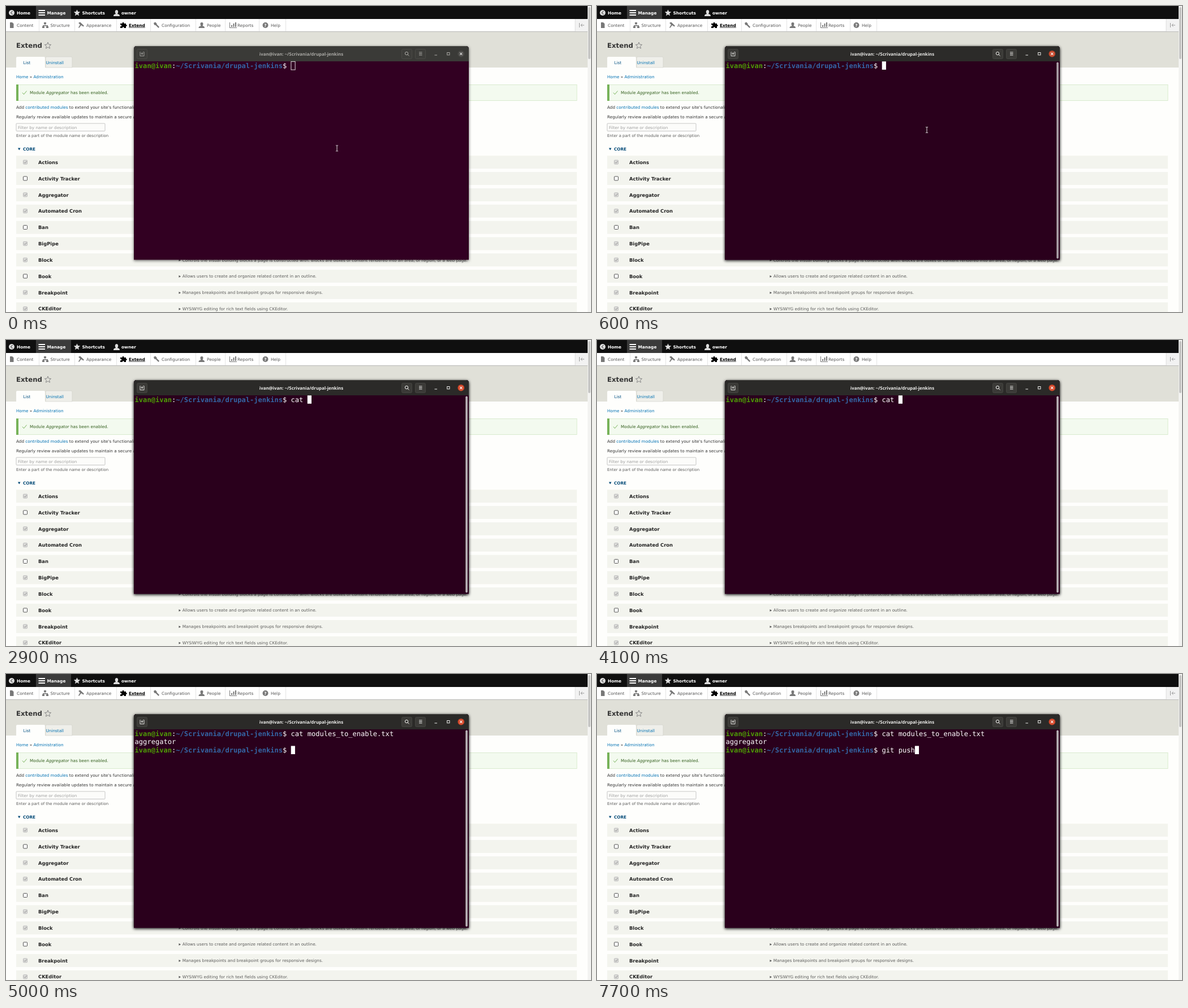
Animation of 1034 by 542 pixels, one loop 8000 ms. Source, as an HTML page:

```html
<!DOCTYPE html>
<html lang="en">
<head>
<meta charset="utf-8">
<title>Terminal over module list</title>
<style>
html, body { margin: 0; width: 100%; height: 100%; overflow: hidden; background: #fefefc; }
svg { display: block; width: 100vw; height: 100vh; }
text { font: 7.25px "DejaVu Sans", sans-serif; fill: #333; white-space: pre; text-rendering: geometricPrecision; }
.bar text { font-size: 7.4px; fill: #565656; }
.bar .top { font-weight: bold; fill: #fff; }
.bar .here { font-weight: bold; fill: #000; text-decoration: underline; }
.link { fill: #0071b3; }
.name { font-size: 8.37px; font-weight: bold; fill: #222; }
.desc { fill: #5c5c5b; }
.title { font: bold 7.85px "Noto Sans", sans-serif; text-anchor: middle; }
#term text { font: 12.07px "DejaVu Sans Mono", monospace; fill: #fff; }
#term .user { font-weight: bold; fill: #4e9a06; }
#term .path { font-weight: bold; fill: #3465a4; }
.line { fill: none; stroke-width: 1; }
</style>
</head>
<body>
<svg viewBox="0 0 1034 542">
  <defs>
    <filter id="shade" x="-5%" y="-5%" width="110%" height="110%">
      <feDropShadow dx="0" dy="1.5" stdDeviation="2.6" flood-opacity=".6"/>
    </filter>
  </defs>
  <rect width="1034" height="542" fill="#fefefc"/>
  <rect y="45" width="1028" height="64" fill="#e0e0d8"/>

  <g class="bar">
    <rect width="1028" height="23" fill="#0f0f0f"/>
    <rect x="53" width="62" height="23" fill="#3b3b3b"/>
    <rect y="23" width="1028" height="22" fill="#fff"/>
    <path d="M0 45.3H1028" stroke="#aaa" stroke-width=".8"/>
    <rect x="1006" y="23" width="22" height="22" fill="#f2f2f2"/>
    <path d="M1006 23V45" stroke="#ddd"/>
    <path class="line" d="M1013.5 30V38M1022 34H1016M1018.5 31.5L1016 34L1018.5 36.5" stroke="#999"/>
    <g id="tabs"></g>
    <circle cx="10" cy="12" r="5" fill="#ddd"/>
    <path class="line" d="M11.5 9L8.5 12L11.5 15" stroke="#111" stroke-width="1.5"/>
    <path d="M57.5 8H69M57.5 12H69M57.5 16H69" stroke="#fff" stroke-width="2"/>
    <g id="star" fill="#ddd"></g>
    <path d="M190 18C190 15 192 14.5 194 14C192 11 192.500 7 195.500 7S199 11 197 14C199 14.500 201 15 201 18Z" fill="#ddd"/>
    <g fill="#787878">
      <path d="M7 29H11L13.500 31.500V39H7Z"/>
      <path d="M67 29H71V32H69.500V34H74V36H75V39H71V36H72.500V35.500H66.500V36H68V39H64V36H65V34H68.500V32H67Z"/>
      <path d="M128 30L131 28.500L138 35L136.500 36.500L133 34L129 39L128 38L131 33Z"/>
      <path d="M261 30L264 28.500L266.500 31V32.500L271 37L269.500 39L264.500 34L262 33.500Z"/>
      <path d="M340.500 39C340.500 36 342.500 36 344.500 35.300C343 32 343 29 346 29S349 32 347.500 35.300C349.500 36 351 36 351 39Z"/>
      <path d="M395 29H396V38H408V39H395ZM398 34H400V37H398ZM401.500 31H403.500V37H401.500ZM405 29H407V37H405Z"/>
      <circle cx="458.500" cy="34" r="5"/>
    </g>
    <text x="458.500" y="36.600" text-anchor="middle" style="fill:#fff;font-weight:bold">?</text>
    <path d="M202 31H206C204.500 28 209.500 28 208 31H212V33.500C214.500 32 214.500 37 212 35.500V39H208.500C209.500 36.500 205 36.500 206 39H202V36C205 37 205 32 202 33.500Z"/>
  </g>

  <text x="18" y="74.200" style="font-size:11.75px;font-weight:bold">Extend</text>
  <g id="fave" class="line" stroke="#888"></g>
  <path d="M18 109V92Q18 90 20 90H67Q69 90 69 92V109Z" fill="#fefefc"/>
  <path d="M70 109V92Q70 90 72 90H115Q117 90 117 92V109Z" fill="#efefea" stroke="#cfcfc6" stroke-width=".6"/>
  <text x="30.500" y="102.700" style="fill:#004f80">List</text>
  <text class="link" x="70.500" y="102.700">Uninstall</text>
  <text x="18" y="127.500"><tspan class="link">Home</tspan> » <tspan class="link">Administration</tspan></text>

  <rect x="18.500" y="139.500" width="990.500" height="28" fill="#f3faef" stroke="#d3e8c5" stroke-width=".8"/>
  <rect x="18" y="139" width="4" height="29" fill="#77b259"/>
  <path class="line" d="M29 153.500L31.500 156.500L36.500 150.500" stroke="#77b259" stroke-width="2"/>
  <text x="42" y="156.200" style="fill:#325e1c">Module <tspan font-style="italic">Aggregator</tspan> has been enabled.</text>

  <text x="18" y="181.700">Add <tspan class="link">contributed modules</tspan> to extend your site's functionality.</text>
  <text x="18" y="198.700">Regularly review available updates to maintain a secure and current site.</text>
  <rect x="18" y="208" width="157" height="13.500" rx="1" fill="#fcfcfa" stroke="#b8b8b8" stroke-width=".8"/>
  <text x="21" y="217.500" style="fill:#a0a0a0">Filter by name or description</text>
  <text x="18" y="231.500" style="font-size:6.9px;fill:#595959">Enter a part of the module name or description</text>
  <path d="M21 251.500H25.500L23.250 255.500Z" fill="#004875"/>
  <text x="30" y="255.700" style="font-weight:bold;fill:#004875">CORE</text>
  <g id="rows"></g>

  <rect x="1028" width="6" height="542" fill="#f3f3f1"/>
  <rect x="1029" y="2" width="4" height="92" rx="2" fill="#c6c6c4"/>

  <g id="windows"></g>
  <g id="term">
    <g id="lines"></g>
    <rect id="caret" width="7.200" height="14.600"/>
    <path id="mouse" class="line" d="M-2 -5H-.7L0 -4.500L.7 -5H2M0 -4.500V4.500M-2 5H-.7L0 4.500L.7 5H2" stroke="#ddd" stroke-width="1.200"/>
  </g>
</svg>
<script>
const get = id => document.getElementById(id);
const text = (x, y, s, cls = '') => `<text x="${x}" y="${y}" class="${cls}">${s}</text>`;

function star(cx, cy, r) {
  const points = Array.from({ length: 10 }, (_, i) => {
    const a = (i / 5 - .5) * Math.PI, d = i % 2 ? r * .45 : r;
    return (cx + d * Math.cos(a)).toFixed(2) + ',' + (cy + d * Math.sin(a)).toFixed(2);
  });
  return `<polygon points="${points.join(' ')}"/>`;
}
get('star').innerHTML = star(125.5, 12.3, 6);
get('fave').innerHTML = star(74, 70.3, 6);

const topTabs = [[19, 'Home'], [72.5, 'Manage'], [134.5, 'Shortcuts'], [204, 'owner']];
const subTabs = [[19, 'Content', 58], [78.5, 'Structure', 121], [142, 'Appearance', 195], [217, 'Extend', 255],
  [275, 'Configuration', 335], [355, 'People', 387], [409, 'Reports', 447], [468, 'Help', 494]];
get('tabs').innerHTML = topTabs.map(([x, s]) => text(x, 14.8, s, 'top')).join('') +
  subTabs.map(([x, s, end]) => text(x, 36.7, s, s === 'Extend' ? 'here' : '') +
    `<path d="M${end + .5} 23V45" stroke="#ddd" stroke-width=".8"/>`).join('');

const modules = [['Actions', 1], ['Activity Tracker', 0], ['Aggregator', 1], ['Automated Cron', 1], ['Ban', 0], ['BigPipe', 1],
  ['Block', 1, 'Controls the visual building blocks a page is constructed with. Blocks are boxes of content rendered into an area, or region, of a web page.'],
  ['Book', 0, 'Allows users to create and organize related content in an outline.'],
  ['Breakpoint', 1, 'Manages breakpoints and breakpoint groups for responsive designs.'],
  ['CKEditor', 1, 'WYSIWYG editing for rich text fields using CKEditor.']];
get('rows').innerHTML = modules.map(([name, on, desc], i) => {
  const y = 276.7 + i * 28.85;
  const box = on ? 'fill="#dcdcda" stroke="#bbb"' : 'fill="#fff" stroke="#555"';
  return `<rect x="18" y="${y - 11.5}" width="991" height="23" fill="#f3f4ee"/>
    <rect x="30.5" y="${y - 3.6}" width="7" height="7" rx="1" ${box}/>` +
    (on ? `<path class="line" d="M32 ${y}l1.500 1.700l3 -3.500" stroke="#8b8b8b"/>` : '') +
    text(57, y + 3.1, name, 'name') +
    (desc ? `<path d="M305.500 ${y - 1.6}v4l3.500 -2Z" fill="#555"/>` + text(311.7, y + 2.8, desc, 'desc') : '');
}).join('');

function frame(id, c) {
  const button = x => `<rect x="${x + .5}" y="76.500" width="18" height="17" rx="2" fill="${c.button}" stroke="${c.edge}" stroke-width=".8"/>`;
  return `<g id="${id}">
    <path d="M226 449.500V76Q226 71 231 71H813Q818 71 818 76V449.500Z" fill="${c.body}" filter="url(#shade)"/>
    <path d="M226 98V76Q226 71 231 71H813Q818 71 818 76V98Z" fill="${c.bar}"/>
    <path d="M230 71.500H814" stroke="${c.edge}" stroke-width=".6"/>
    ${[231, 699, 723].map(button).join('')}
    <g class="line" stroke="${c.ink}">
      <path d="M237.500 81.500H237V88.500H244V81.500H242.500M240.500 82V86.500M238.300 84.300H242.700" stroke-width=".9"/>
      <circle cx="708" cy="84" r="2.700"/><path d="M710 86L712.500 88.500"/>
      <path d="M730 82H735.500M730 84.500H735.500M730 87H735.500M757.500 87H762"/>
      <rect x="779.700" y="82.500" width="4.300" height="4.300"/>
    </g>
    <circle cx="804.300" cy="84.700" r="5.800" fill="${c.close}"/>
    <path d="M802.200 82.600l4.200 4.200m0 -4.200l-4.200 4.200" stroke="${c.cross}" stroke-width="1.200"/>
    <text class="title" x="522" y="87.500" style="fill:${c.ink}">ivan@ivan: ~/Scrivania/drupal-jenkins</text>
    ${c.scroll ? '<rect x="812.300" y="99.500" width="3.600" height="348" rx="1.800" fill="#b9b3b7"/>' : '<path d="M815.500 98V449" stroke="#260019"/>'}
  </g>`;
}
get('windows').innerHTML =
  frame('idle', { body: '#310022', bar: '#3a3a37', button: '#3d3d3a', edge: '#504f4b', ink: '#aaa9a5', close: '#4c4b48', cross: '#ddd' }) +
  frame('active', { body: '#2c001e', bar: '#2b2a28', button: '#3b3a37', edge: '#4a4946', ink: '#f0f0ee', close: '#d5492b', cross: '#fff', scroll: true });

const LEFT = 227.6, CELL = 7.266, ROW = 14.6, PROMPT = 38;
const prompt = '<tspan class="user">ivan@ivan</tspan>:<tspan class="path">~/Scrivania/drupal-jenkins</tspan>$ ';
const cat = 'cat modules_to_enable.txt';
const typing = [[0, ''], [2900, 'cat '], [4200, 'cat mo'], [4500, cat + ' '],
  [5000, ''], [7300, 'git'], [7400, 'git p'], [7600, 'git pus'], [7700, 'git push']];
const blink = [[0, 1], [1100, 0], [1900, 1], [2500, 0], [2700, 1], [3500, 0], [4100, 1],
  [5400, 0], [6000, 1], [6600, 0], [7200, 1]];
const focus = [[0, 0], [600, .9], [700, .96], [800, 1]];
const pointer = [[0, 585, 252], [100, 585, 248], [200, 584, 238], [300, 583, 226], [400, 583, 219.5]];
const at = (steps, t) => steps.filter(s => s[0] <= t).pop();

let shown;
function draw(now) {
  const t = now % 8000;
  const [, typed] = at(typing, t), [, lit] = at(blink, t), [, active] = at(focus, t), [, x, y] = at(pointer, t);
  const row = t < 5000 ? 0 : 2;
  const lines = row ? [prompt + cat, 'aggregator', prompt + typed] : [prompt + typed];
  const markup = lines.map((s, i) => text(LEFT, 109.8 + i * ROW, s)).join('');
  if (markup !== shown) get('lines').innerHTML = shown = markup;

  get('active').setAttribute('opacity', active);
  const caret = get('caret'), inset = active ? 0 : .5;
  caret.setAttribute('x', LEFT + (PROMPT + typed.length) * CELL + inset * .4);
  caret.setAttribute('y', 98.2 + row * ROW + inset * .4);
  caret.setAttribute('fill', active ? '#fff' : 'none');
  caret.setAttribute('stroke', active ? 'none' : '#ddd');
  caret.setAttribute('visibility', lit ? 'visible' : 'hidden');

  const mouse = get('mouse');
  mouse.setAttribute('transform', `translate(${x} ${y})`);
  mouse.setAttribute('visibility', t < 2700 ? 'visible' : 'hidden');
  requestAnimationFrame(() => draw(performance.now()));
}
draw(performance.now());
</script>
</body>
</html>
```
